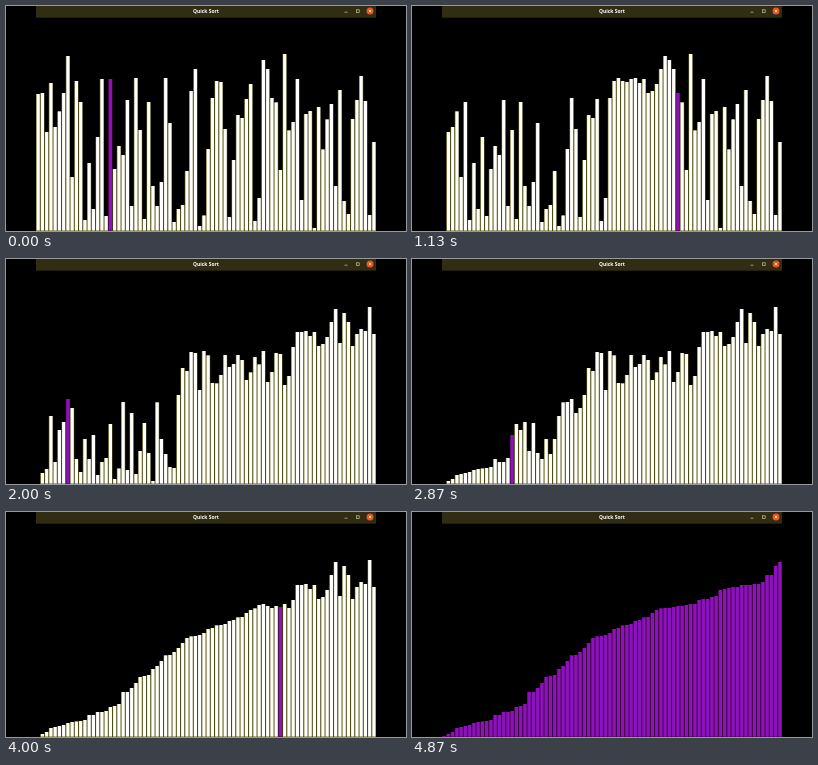
These frames come from a looping animation (400x225 px, 4990 ms). An HTML page with a canvas:

```html
<!DOCTYPE html>
<html lang="en">
<head>
<meta charset="utf-8">
<title>Quick Sort</title>
<style>
  html, body { margin: 0; width: 100%; height: 100%; overflow: hidden; background: #000; }
  canvas, svg { position: absolute; left: 0; top: 0; width: 400px; height: 225px; }
  text { font: bold 5px "Open Sans", "Noto Sans", sans-serif; fill: #fff; text-anchor: middle; }
</style>
</head>
<body>
<canvas id="stage" width="400" height="225"></canvas>
<svg viewBox="0 0 400 225">
  <rect x="30" width="340" height="11.7" fill="#302d12"/>
  <text x="200" y="7">Quick Sort</text>
  <g fill="none" stroke="#c9c5a0" stroke-width=".7">
    <path d="M338.5 6.2h3"/>
    <rect x="350.6" y="3.8" width="2.6" height="2.6"/>
  </g>
  <circle cx="364" cy="5" r="3.5" fill="#e9541f"/>
  <path d="M362.8 3.8l2.4 2.4m0-2.4l-2.4 2.4" stroke="#fff" stroke-width=".7"/>
</svg>
<script>
const LOOP = 4990, FRAME = 200 / 3, LAST_FRAME = 73;
const FIRST_STEP = 17, STEPS_PER_FRAME = 6.86;
const LEFT = 30, PITCH = 4.25, VISIBLE = 80, FLOOR = 225;
const WHITE = { fill: '#fff', edge: '#68641c' };
const PURPLE = { fill: '#8c12be', edge: '#4c0a48' };

// Top edge of each bar; the last one lies beyond the window's right side.
const tops = [
  88, 87, 126, 77, 121, 105.4, 87, 50, 171, 75, 96, 214, 157, 203, 131, 73, 210, 73, 163, 140,
  149, 94, 200, 72, 124, 213, 96, 180, 200, 176, 72, 117, 216, 203, 199, 165, 85, 63, 220, 209.5,
  143, 92, 75, 76, 123, 211, 154, 109, 112, 93, 78, 215, 192, 54, 63, 92, 96.4, 164, 48, 124.4,
  116, 73, 194, 108, 105, 222, 101, 143.4, 113.4, 98, 180, 84, 195, 208, 113, 94, 70, 95, 209, 136,
  224
];

const steps = [];

function swap(a, i, j) {
  [a[i], a[j]] = [a[j], a[i]];
}

// Last element as pivot; every comparison is one step of the animation.
function quickSort(a, low, high) {
  if (low >= high) return;
  let split = low;
  for (let j = low; j < high; j++) {
    if (a[j] < a[high]) swap(a, split++, j);
    steps.push({ bars: a.slice(), cursor: j });
  }
  swap(a, split, high);
  quickSort(a, low, split - 1);
  quickSort(a, split + 1, high);
}

const heights = tops.map(y => FLOOR - y);
quickSort(heights, 0, heights.length - 1);

const ctx = document.getElementById('stage').getContext('2d');

function drawBar(i, height, color) {
  const x = LEFT + i * PITCH;
  ctx.fillStyle = color.edge;
  ctx.fillRect(x, FLOOR - height, PITCH, height);
  ctx.fillStyle = color.fill;
  ctx.fillRect(x + 0.6, FLOOR - height, PITCH - 1.1, height - 0.5);
}

function draw(time) {
  const frame = Math.min(LAST_FRAME, Math.floor((time % LOOP + 3.4) / FRAME));
  const step = steps[FIRST_STEP + Math.round(frame * STEPS_PER_FRAME)];
  const bars = step ? step.bars : heights;
  ctx.clearRect(0, 0, 400, 225);
  for (let i = 0; i < VISIBLE; i++) {
    if (bars[i] <= 1 && step) continue;
    drawBar(i, bars[i], !step || i === step.cursor ? PURPLE : WHITE);
  }
}

const start = performance.now();
function tick() {
  draw(performance.now() - start);
  requestAnimationFrame(tick);
}
tick();
</script>
</body>
</html>
```
